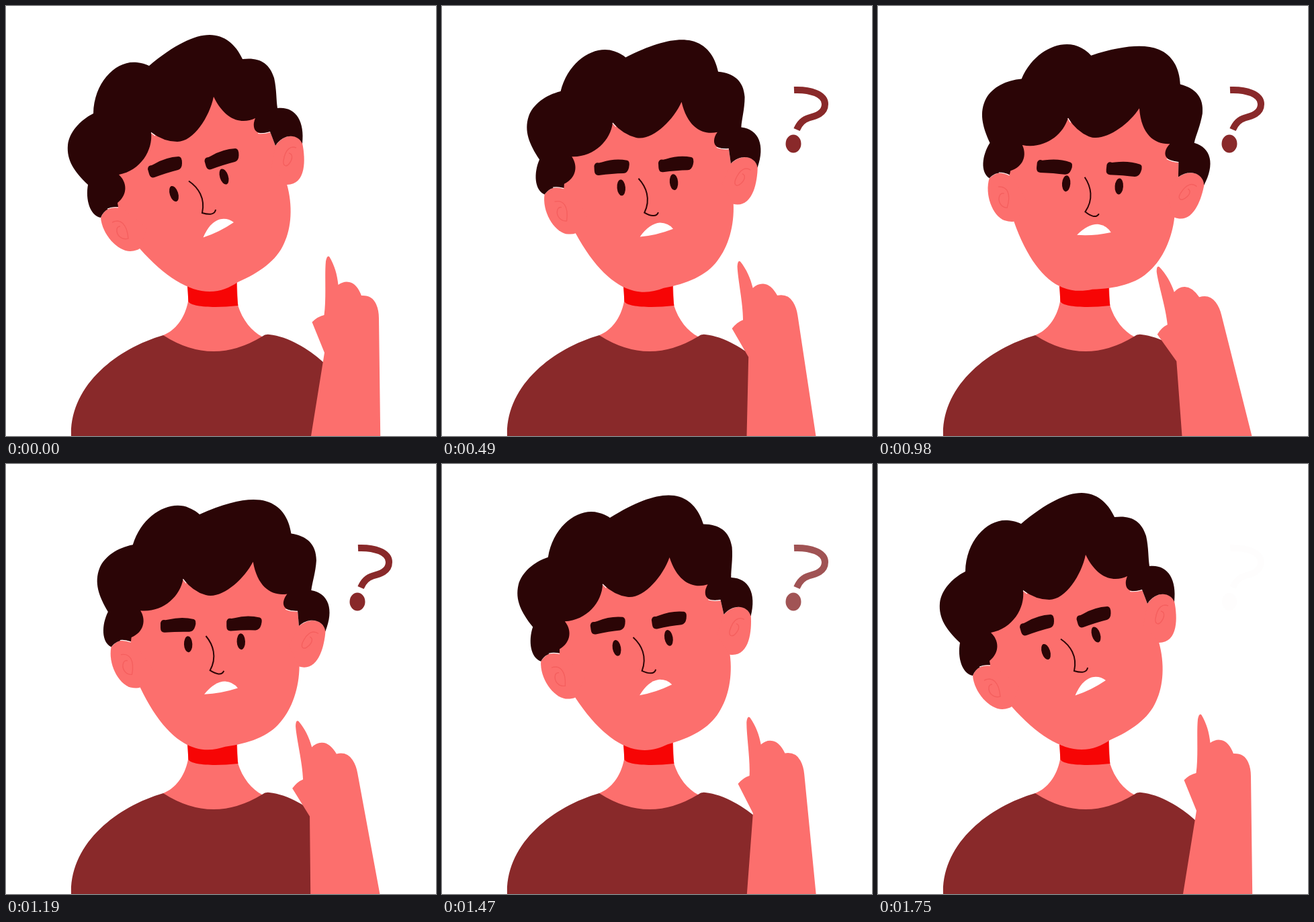
Recreate the animation shown at these times as an HTML page with a canvas. Size 640x640 px, loop 1.82 s.

```html
<!DOCTYPE html>
<html lang="en">
<head>
<meta charset="utf-8">
<title>Doubtful man</title>
<style>
html, body { margin: 0; width: 100%; height: 100%; overflow: hidden; background: #fff; }
canvas { display: block; width: 100vw; height: 100vh; }
</style>
</head>
<body>
<canvas id="stage" width="640" height="640"></canvas>
<script>
const ctx = document.getElementById('stage').getContext('2d');

const LOOP = 1820, STEP = 70, PEAK = 910, END = 1750;
const SKIN = '#fc6f6d', HAIR = '#2b0506', SHIRT = '#89292a', SHADOW = '#f70505', EAR_LINE = '#f55f5e';
const HEAD_PIVOT = [303.5, 277.6], HAND_PIVOT = [513, 649];

const shapes = {
  neck: 'M271 400 L271 440 C266 465 252 483 234 490 L234 520 L381 520 L381 492 C366 484 352 468 345 445 L343.5 400 Z',
  neckShadow: 'M270 400 L270 418 L271.5 440 C276 448 310 450 345.5 446 Q343.3 432 343.3 400 Z',
  shirt: 'M97 641 C94 565 165 510 234 490 Q307 537 381 492 Q386 488 392 489 C420 492 450 510 472 530 L485 540 L490 641 Z',
  face: 'M165 300 L168 245 L214 184 L309 130 L371 162 L393 187 L401 208 L418 265 C427 297 425 330 414 353 ' +
    'C403 379 377 397 345 411 C333 419 320 425 303 425 C272 425 236 403 199 361 Z',
  leftEar: 'M141 315 C143 340 166 365 185 365 Q195 364 199 361 L210 330 L168 296 Q148 299 141 315 Z',
  rightEar: 'M401 208 C414 190 433 189 441 204 C446 228 447 266 418 266 L395 240 Z',
  hair: 'M141 315 C125 312 118 288 122 266 C102 247 90 230 92 207 C94 188 110 170 130 160 ' +
    'C131 112 165 80 195 84 Q205 85 213 89 C250 58 280 43 303 43 C325 43 342 57 352 79 ' +
    'C376 76 392 84 399 107 C403 125 402 140 404 152 C430 149 445 170 441 205 ' +
    'C435 190 413 189 401 208 L393 187 C385 190 371 192 369 180 Q368 174 371 167 ' +
    'C352 176 327 172 309 135 C303 165 279 202 255 202 Q235 202 216 188 ' +
    'C219 215 200 245 168 251 C180 262 182 280 166 293 L167 299 C155 299 146 303 141 315 Z',
  gaps: 'M151 302 Q158 299 167 300 M375 189.5 Q384 190.5 393 187.5 M216 188.5 L222 193',
  earLines: 'M158 322 C170 316 180 324 182 346 C172 349 164 341 165 332 Q166 328 170 328 ' +
    'M432 211 C424 208 416 212 413 230 C412 239 418 240 422 234 C427 227 427 220 421 219',
  brow: 'M211 243 Q211 237 217 237 L221 235 Q238 225 257 224 Q262 224 262 234 Q262 242 256 244 ' +
    'Q240 248 221 255 Q215 257 213 250 Z',
  nose: 'M272 260.5 C286 270 297 286 292 308 C302 311 311 311 312 303',
  mouth: 'M293.5 344.5 Q303 322 318 317.5 Q330 315 339 322 Q317 337 293.5 344.5 Z',
  hand: 'M444 702 L474 516 L455.5 470.5 Q464 462 473.5 460 C477 435 474 400 476 380 Q478 370 481.5 373.5 ' +
    'C489 386 493 400 494.5 415 Q503 409 511 411 Q522 413 529 431 Q545 430 551 444 Q555 453 555 465 L558 702 Z',
  hook: 'M524 125 C548 124 570 131 570 146 C570 160 556 164 546 166.5 C537 169 531 177 528 184'
};
for (const name in shapes) shapes[name] = new Path2D(shapes[name]);

function fill(name, color) {
  ctx.fillStyle = color;
  ctx.fill(shapes[name]);
}

function line(name, color, width) {
  ctx.strokeStyle = color;
  ctx.lineWidth = width;
  ctx.stroke(shapes[name]);
}

function oval(x, y, rx, ry, tilt, color) {
  ctx.fillStyle = color;
  ctx.beginPath();
  ctx.ellipse(x, y, rx, ry, tilt * Math.PI / 180, 0, Math.PI * 2);
  ctx.fill();
}

function posed([x, y], degrees, dx, dy, draw) {
  ctx.save();
  ctx.translate(x + dx, y + dy);
  ctx.rotate(degrees * Math.PI / 180);
  ctx.translate(-x, -y);
  draw();
  ctx.restore();
}

function brow(dx, dy) {
  ctx.save();
  ctx.translate(dx, dy);
  fill('brow', HAIR);
  ctx.restore();
}

function drawHead(swing) {
  fill('face', SKIN);
  fill('leftEar', SKIN);
  fill('rightEar', SKIN);
  fill('hair', HAIR);
  line('gaps', '#fff', 1.1);
  line('earLines', EAR_LINE, 1.4);
  // the left brow sinks while the head straightens
  brow(-14 * swing, 26 * swing);
  brow(84.5, -12);
  oval(250, 279.5, 6.2, 12, -18, HAIR);
  oval(324.5, 254, 6.2, 12, -18, HAIR);
  line('nose', HAIR, 2);
  fill('mouth', '#fff');
}

function drawMark(alpha) {
  ctx.globalAlpha = alpha;
  line('hook', SHIRT, 10);
  oval(523, 205, 11.5, 13.5, 0, SHIRT);
  ctx.globalAlpha = 1;
}

function draw(t) {
  const swing = t < PEAK ? t / PEAK : Math.max(0, (END - t) / (END - PEAK));
  const alpha = Math.max(0, Math.min(1, t / 350, 1 - (t - 1400) / 353));

  ctx.fillStyle = '#fff';
  ctx.fillRect(0, 0, 640, 640);
  drawMark(alpha);
  fill('neck', SKIN);
  fill('neckShadow', SHADOW);
  fill('shirt', SHIRT);
  posed(HEAD_PIVOT, 24 * swing, 29.4 * swing, 5.3 * swing, () => drawHead(swing));
  posed(HAND_PIVOT, -14.6 * swing, 0, 0, () => fill('hand', SKIN));
}

function tick() {
  const t = performance.now() % LOOP;
  draw(Math.floor(t / STEP) * STEP);
  requestAnimationFrame(tick);
}
tick();
</script>
</body>
</html>
```
